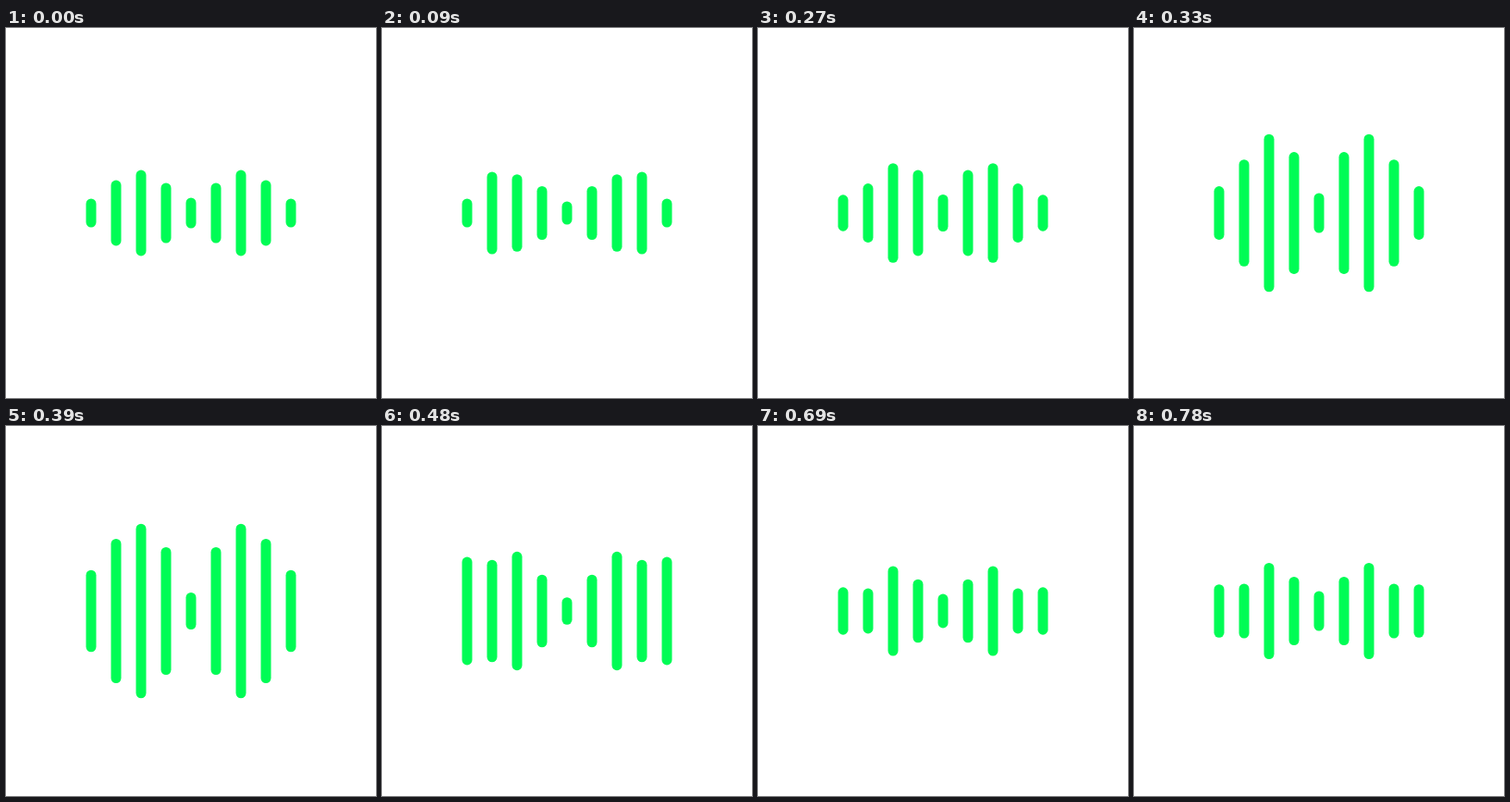
Write an HTML page with a canvas that moves like this. It is 400 px wide and 400 px high and loops after 0.81 s.

```html
<!DOCTYPE html>
<html lang="en">
<head>
<meta charset="utf-8">
<title>Sound bars</title>
<style>
  html, body { margin: 0; width: 100%; height: 100%; overflow: hidden; background: #fff; }
  canvas { display: block; width: 400px; height: 400px; }
</style>
</head>
<body>
<canvas id="stage" width="400" height="400"></canvas>
<script>
const ctx = document.getElementById('stage').getContext('2d');
const LOOP = 810, STEP = 30;
const CENTER = 200, SPACING = 27, WIDTH = 11;
const BEAT = 450, BEAT_PEAK = 330;

// Smooth bump of the given height around one moment.
const pulse = (time, peak, spread, height) =>
  height * Math.exp(-(((time - peak) / spread) ** 2) / 2);

const sway = (time, size) =>
  size * Math.cos(2 * Math.PI * (time - BEAT_PEAK) / BEAT);

// Half-height of each bar over time, from the middle outwards.
const bars = [
  t => 17 + sway(t, 4.5),
  t => 33 + sway(t, 4) + pulse(t, 370, 65, 35),
  t => 47 + sway(t, 5) + pulse(t, 210, 40, -31) + pulse(t, 385, 75, 44),
  t => 22 + sway(t, 7.5) + pulse(t, 75, 60, 31) + pulse(t, 210, 40, -11) + pulse(t, 415, 75, 54),
  t => 15.5 + pulse(t, 475, 95, 43) + pulse(t, 780, 80, 13)
];

function drawBar(x, half) {
  ctx.beginPath();
  ctx.roundRect(x - WIDTH / 2, CENTER - half, WIDTH, half * 2, WIDTH / 2);
  ctx.fill();
}

function draw(now) {
  const time = Math.floor((now % LOOP) / STEP) * STEP;
  ctx.fillStyle = '#fff';
  ctx.fillRect(0, 0, 400, 400);
  ctx.fillStyle = '#00fc55';
  bars.forEach((halfAt, i) => {
    const half = halfAt(time);
    drawBar(CENTER + i * SPACING, half);
    if (i) drawBar(CENTER - i * SPACING, half);
  });
}

const start = performance.now();
function tick() {
  draw(performance.now() - start);
  requestAnimationFrame(tick);
}
tick();
</script>
</body>
</html>
```
